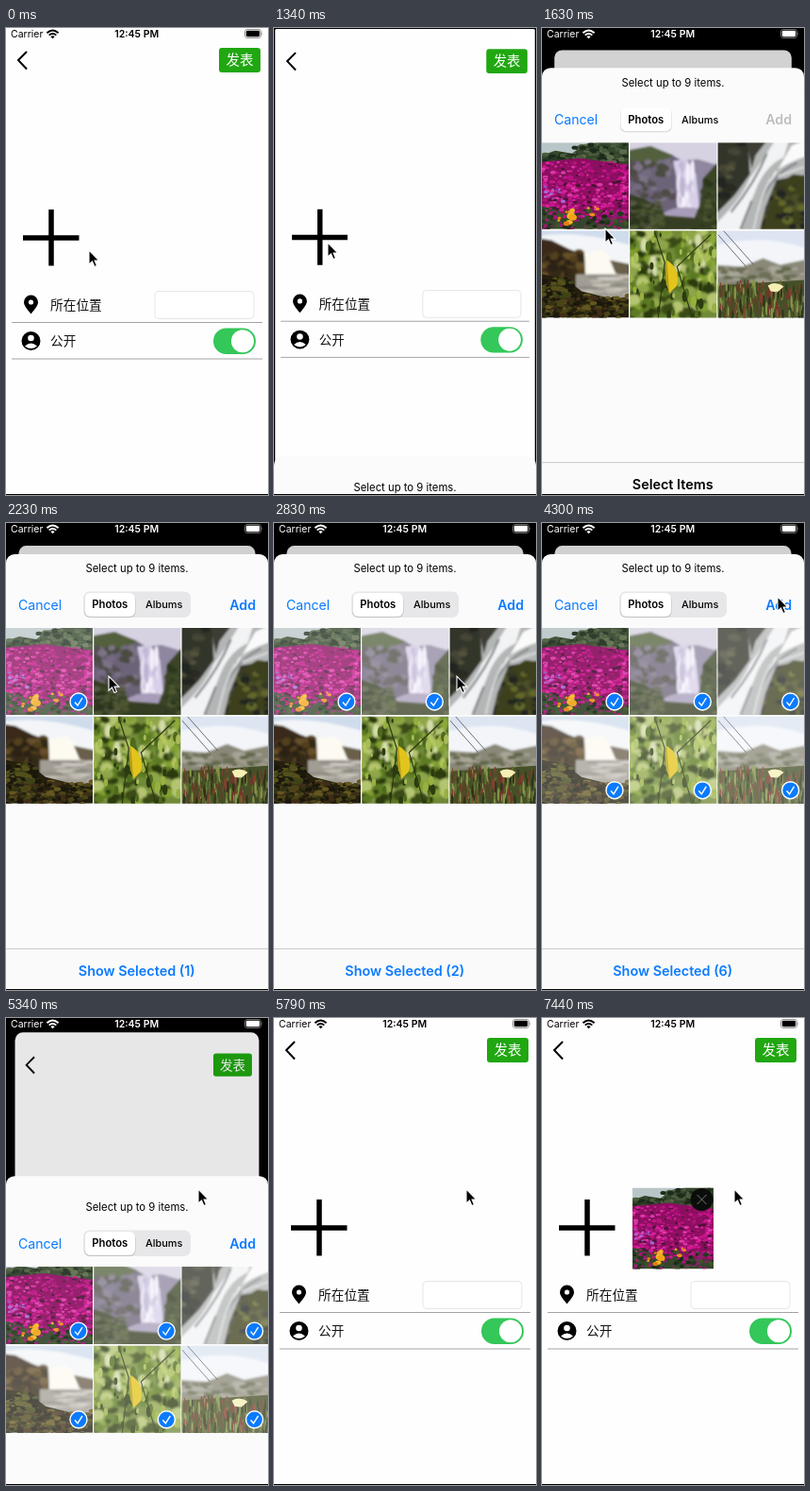
Recreate the animation shown at these times as an HTML page. Size 278x494 px, loop 8 s.

```html
<!DOCTYPE html>
<html lang="zh-CN">
<head>
<meta charset="utf-8">
<style>
  html, body { margin: 0; width: 100%; height: 100%; overflow: hidden; background: #000; }
  svg { font-family: Inter, Roboto, sans-serif; }
  #stage { display: block; width: 100vw; height: 100vh; }
  .cjk { font-family: "Noto Sans CJK SC", "Noto Sans CJK", sans-serif; font-size: 13.7px; }
  .mid { text-anchor: middle; }
  .semi { font-weight: 600; }
</style>
</head>
<body>
<svg id="stage" viewBox="0 0 278 494">
  <defs id="defs"></defs>
  <rect width="278" height="494"/>

  <g id="page">
    <rect id="card" width="278" height="494" fill="#fefefe"/>
    <g id="content">
      <path d="M22 25L13 34L22 43.5" fill="none" stroke="#000" stroke-width="2"/>
      <rect x="226" y="21" width="44" height="26" rx="3" fill="#20a711"/>
      <text class="cjk mid" x="248" y="39.3" fill="#fff" style="font-size:14.5px">发表</text>
      <path d="M18 222H77.5M48 192V251.5" stroke="#000" stroke-width="5.5"/>
      <path d="M26.5 302.5C21.5 296.5 19 293 19 290a7.5 7.5 0 0 1 15 0C34 293 31.5 296.5 26.5 302.5Z"/>
      <circle cx="26.5" cy="290" r="2.6" fill="#fff"/>
      <text class="cjk" x="47" y="297.8" fill="#111">所在位置</text>
      <rect x="158" y="278.5" width="105" height="29" rx="4" fill="#fff" stroke="#e6e6e6"/>
      <path d="M6 311.5H272M6 350H272" stroke="#a4a4a4"/>
      <circle cx="26.5" cy="331" r="10"/>
      <circle cx="26.5" cy="328" r="3.3" fill="#fff"/>
      <path d="M20 336.5Q26.5 330.5 33 336.5Q26.5 341.5 20 336.5Z" fill="#fff"/>
      <text class="cjk" x="47" y="336.3" fill="#111">公开</text>
      <rect x="220" y="317.5" width="45" height="27.5" rx="13.7" fill="#34c759"/>
      <circle cx="251" cy="331.2" r="12" fill="#fff"/>
      <g id="thumb">
        <use href="#photo0" transform="translate(96 179.5) scale(.935)"/>
        <circle cx="169.5" cy="192" r="12" fill="#0b0d0b"/>
        <path d="M164.5 187L174.5 197M174.5 187L164.5 197" stroke="#777"/>
      </g>
    </g>
    <rect id="dim" width="278" height="494"/>
  </g>

  <g id="status">
    <text x="5" y="10.2" font-size="10.5">Carrier</text>
    <g fill="none" stroke="currentColor" stroke-width="1.9">
      <path d="M43.4 5.2Q49.5 -.4 55.6 5.2M45.7 7.6Q49.5 4.2 53.3 7.6"/>
    </g>
    <path d="M47.4 9.2Q49.5 7.4 51.6 9.2L49.5 11.2Z"/>
    <text class="mid semi" x="138.7" y="10.2" font-size="10.5">12:45 PM</text>
    <rect x="253.5" y="1.5" width="17" height="9" rx="2.5" fill="none" stroke="currentColor" stroke-opacity=".45" stroke-width=".9"/>
    <rect x="254.8" y="2.8" width="14.4" height="6.4" rx="1.4"/>
    <path d="M271.6 4.6q1.6 1.4 0 2.8Z" opacity=".5"/>
  </g>

  <g id="sheet">
    <rect y="33" width="278" height="480" rx="9" fill="#fbfbfb"/>
    <g id="grid"></g>
    <g id="header">
      <rect y="60" width="278" height="51" fill="#fbfbfb"/>
      <text class="mid" x="139" y="51.7" font-size="11.3">Select up to 9 items.</text>
      <text x="13" y="91.5" font-size="14.1" fill="#0a7aff">Cancel</text>
      <rect id="track" x="82" y="72.5" width="114" height="27.5" rx="7" fill="#e7e7e9"/>
      <rect x="83" y="75" width="54.5" height="25" rx="6" fill="#000" opacity=".16"/>
      <rect x="83.5" y="74" width="53.5" height="25" rx="6" fill="#fff"/>
      <text class="mid semi" x="110.3" y="90.4" font-size="11.3">Photos</text>
      <text class="mid" x="167.7" y="90.4" font-size="10.9" font-weight="500">Albums</text>
      <text id="add" class="semi" x="265" y="91.8" font-size="14.2" text-anchor="end">Add</text>
    </g>
    <rect y="450" width="278" height="60" fill="#fafafa"/>
    <path d="M0 450.5H278" stroke="#cacaca"/>
    <text id="summary" class="mid semi" x="138.7" y="479.1" font-size="14.4"></text>
  </g>

  <path id="cursor" d="M0 0V15.2L3.5 12L6 17.6L8.5 16.5L6.1 11.1H10.8Z" stroke="#fff" stroke-width="1.1"/>
  <rect y="493" width="278" height="1"/>
</svg>

<script>
const $ = id => document.getElementById(id);

// Photo drawing: soft shapes plus seeded specks, on a 92 x 92 square.
const shape = (fill, d) => `<path fill="${fill}" d="${d}"/>`;
const line = (stroke, width, d) => `<path fill="none" stroke="${stroke}" stroke-width="${width}" d="${d}"/>`;
function specks(seed, count, x, y, w, h, rx, ry, colors) {
  const random = () => (seed = (seed * 16807) % 2147483647) / 2147483647;
  random(); random();
  const palette = colors.split(' ');
  let out = '';
  for (let i = 0; i < count; i++) {
    const cx = x + random() * w, cy = y + random() * h, k = .5 + random();
    out += `<ellipse cx="${cx.toFixed(1)}" cy="${cy.toFixed(1)}" rx="${(rx * k).toFixed(1)}" ry="${(ry * k).toFixed(1)}" fill="${palette[i % palette.length]}"/>`;
  }
  return out;
}
const soft = art => `<g filter="url(#blur)">${art}</g>`;

const photos = [
  // magenta flower field
  shape('#b9c6c8', 'M0 0H92V30H0Z') +
  shape('#35462c', 'M0 14L14 9L32 12L44 3L60 0H92V92H0Z') +
  specks(11, 90, 34, 2, 58, 20, 3, 2, '#1c2b1b #48593a #33472b #5c6b4a') +
  specks(13, 40, 0, 13, 40, 8, 3, 1.5, '#2a3b24 #4a5c3a #1c2b1b') +
  shape('#8c0e60', 'M0 21L40 17L92 24V82L50 78L0 66Z') +
  specks(23, 420, 0, 21, 92, 58, 2, 1.2, '#c8148a #da1f9c #a01070 #b81280 #4a1436 #dc3aa8 #c8148a') +
  specks(31, 110, 0, 72, 92, 20, 2.4, 1.7, '#26381f #3c5329 #1c2917 #8b1e69 #a8167a') +
  specks(8, 14, 2, 46, 22, 18, 1.7, 1.3, '#a867d6 #8d55bd') +
  specks(17, 10, 16, 72, 18, 16, 3, 2.3, '#f0a419 #f4b927 #e67d17') +
  specks(5, 5, 48, 66, 14, 16, 1.8, 1.5, '#ef8b1c #e7a626'),
  // tall waterfall among hills
  soft(shape('#d6d2e2', 'M-4 -4H96V44H-4Z') +
    shape('#6c6478', 'M-4 10L20 5L44 13L54 19L60 92H-4Z') +
    shape('#53603c', 'M-4 9L22 4L46 14L30 24L-4 32Z') +
    specks(41, 60, 0, 20, 46, 40, 4, 3, '#746a82 #564f52 #7c7385 #4b4c42') +
    shape('#8f86a0', 'M50 20L72 18L92 24V74H50Z') +
    shape('#d8d0e8', 'M46 20L60 18L70 34L74 72L52 80L50 40Z') +
    specks(43, 30, 51, 24, 16, 50, 1.6, 8, '#f4f0fa #bdb3d2 #d4cbe6 #e8e2f4') +
    shape('#a79cba', 'M34 76Q52 64 78 72L70 86H32Z') +
    shape('#3b4528', 'M96 18V96H62L74 66L78 38Z')) +
  soft(shape('#353d24', 'M-4 54L16 60L38 78L66 80L96 86V96H-4Z') +
    specks(47, 70, 0, 64, 34, 28, 4, 2, '#2a341f #4d5630 #394527 #55593f') +
    specks(48, 40, 76, 40, 18, 50, 3, 2, '#2c351f #4d5a30 #3a4427')),
  // silky stream over dark rocks
  soft(shape('#33342a', 'M-4 -4H96V96H-4Z') +
    specks(53, 70, 0, 0, 92, 92, 5, 3, '#222720 #444436 #53523a #292c24') +
    shape('#b4b6b6', 'M32 -4H96V34L62 40L50 70L44 96H-4V78L18 56L34 34Z') +
    shape('#3d3e34', 'M30 -4H54L40 14L36 28Z') +
    shape('#f2f3f4', 'M62 -4H76L70 16Q52 24 42 46L22 96H-4V88Q24 62 34 38Q46 22 62 -4Z') +
    shape('#fafafa', 'M78 4L96 -4V14Q72 22 60 32L52 50Z') +
    line('#83888a', 2.4, 'M52 12Q40 42 14 74M84 22Q58 34 46 62M36 62L24 92') +
    line('#d8dadb', 2, 'M56 38Q44 60 38 92M92 26L64 36') +
    shape('#3c3f1f', 'M64 44L80 34L96 36V96H46L54 70Z') +
    specks(59, 34, 60, 46, 32, 46, 4, 3, '#62662c #232820 #4c5028 #343724')),
  // wide fall under a cliff
  soft(shape('#cfdcec', 'M-4 -4H96V50H-4Z') +
    shape('#f3f5f8', 'M-4 6Q36 -2 96 16V40H-4Z') +
    shape('#3a2c1a', 'M-4 8L10 10L28 19L46 26L50 46L44 60H-4Z') +
    specks(61, 50, 0, 22, 42, 26, 4, 3, '#2a2014 #53401f #332918 #66502a') +
    shape('#fdfaf2', 'M45 24L64 20L76 32L80 47H46Z') +
    shape('#6a5f4c', 'M72 31L96 36V50L78 45Z') +
    shape('#a29d94', 'M36 46H96V76H36Z') +
    specks(67, 22, 44, 48, 48, 20, 10, 1.2, '#cfcbc2 #8d8a82 #bab6ac')) +
  shape('#241f0e', 'M0 46L24 50L42 64L66 70L92 72V92H0Z') +
  specks(71, 170, 0, 68, 92, 24, 3, 1.7, '#4b4418 #1a170c #655720 #343414 #402d18') +
  specks(72, 50, 0, 50, 34, 20, 3, 1.8, '#55501c #1a170c #3e4318'),
  // foliage with one yellow leaf
  soft(shape('#718a38', 'M-4 -4H96V96H-4Z') +
    specks(73, 190, 0, 0, 92, 92, 5, 4, '#3a4c18 #8ea648 #5c7a20 #b4c470 #2c3a10 #82a030') +
    specks(79, 34, 0, 0, 92, 50, 2.5, 5, '#d4dca8 #8cac38 #4a6420 #b4c860')) +
  specks(81, 60, 0, 0, 92, 92, 2, 4, '#2c3c10 #98b040 #4e6a1c #a8bc58') +
  line('#2c3812', 1.2, 'M26 0L37 34L30 92M86 4L50 38L66 92') +
  shape('#e2c41c', 'M39 31Q54 40 50 58L42 66Q35 48 39 31Z') +
  shape('#b39c1a', 'M39 31L42 66Q35 48 39 31Z'),
  // meadow on a slope
  soft(shape('#dde5f2', 'M-4 -4H96V60H-4Z') +
    shape('#f3f5f9', 'M-4 16Q50 2 96 20V40H-4Z') +
    shape('#8a8878', 'M-4 36L26 38L48 29L66 36L96 30V96H-4Z') +
    specks(83, 90, 0, 40, 92, 20, 5, 2, '#a09c8c #6c7056 #a8a698 #5f6648')) +
  line('#4a4d50', .8, 'M0 4L30 38M6 0L38 36') +
  shape('#465028', 'M0 58L92 52V92H0Z') +
  specks(89, 260, 0, 58, 92, 34, .9, 5, '#5c6e30 #6e3828 #2c341a #87954a #82402f #424e24') +
  shape('#f4efb5', 'M53 58Q61 53 70 59L63 65L56 64Z') +
  line('#84994a', 1, 'M62 64L60 82')
];
$('defs').innerHTML = '<filter id="blur"><feGaussianBlur stdDeviation=".9"/></filter>' + photos.map((art, i) =>
  `<clipPath id="clip${i}"><path d="M0 0H92V92H0Z"/></clipPath><g id="photo${i}" clip-path="url(#clip${i})">${art}</g>`).join('');

$('grid').innerHTML = photos.map((_, i) =>
  `<g transform="translate(${i % 3 * 93.3} ${111 + Math.floor(i / 3) * 93.7})">
    <use href="#photo${i}"/>
    <g class="mark">
      <rect width="92" height="92" fill="#fff" opacity=".24"/>
      <circle cx="77" cy="78" r="9" fill="#0a7aff" stroke="#fff" stroke-width="1.4"/>
      <path d="M73 78.5L76 82L81 74" fill="none" stroke="#fff" stroke-width="1.4"/>
    </g>
  </g>`).join('');
const marks = document.querySelectorAll('.mark');

const LOOP = 8000, TICK = 148.6, LEAD = 10;
const OPEN = 1300, CLOSE = 5280, TRAVEL = 461;
const selectTicks = [14, 17, 20, 26, 24, 22];
const cursorPath = [
  [0, 88, 235], [3, 57, 227], [9, 57, 227], [11, 67, 212], [13, 64, 168], [14, 68, 164],
  [15, 109, 162], [17, 142, 160], [18, 158, 160], [20, 230, 164], [22, 226, 246],
  [23, 136, 237], [24, 133, 240], [26, 50, 246], [27, 80, 215], [29, 250, 78],
  [31, 249, 81], [36, 204, 181], [54, 204, 181]
];

function cursorAt(tick) {
  const i = cursorPath.findIndex(key => key[0] > tick);
  const [t0, x0, y0] = cursorPath[i - 1], [t1, x1, y1] = cursorPath[i];
  const k = (tick - t0) / (t1 - t0);
  return [x0 + (x1 - x0) * k, y0 + (y1 - y0) * k];
}

// Critically damped spring: share of the way still to go.
function remaining(ms) {
  const s = Math.max(0, ms) * .018;
  return (1 + s) * Math.exp(-s);
}

const show = (el, on) => { el.style.display = on ? '' : 'none'; };
const move = (el, x, y) => el.setAttribute('transform', `translate(${x} ${y})`);

function render(time) {
  const tick = Math.floor((time + LEAD) / TICK);
  const t = tick * TICK - LEAD;
  let open = t < CLOSE ? 1 - remaining(t - OPEN) : remaining(t - CLOSE);
  if (open < .005) open = 0;

  const scale = 1 - .097 * open;
  $('page').setAttribute('transform',
    `translate(${139 * (1 - scale)} ${24 * open ** 1.3}) scale(${scale})`);
  for (const id of ['card', 'dim']) $(id).setAttribute('rx', 9 * Math.min(1, open * 2));
  $('dim').setAttribute('opacity', .18 * open * open);
  move($('content'), 0, 4 * open);
  show($('thumb'), tick >= 50);

  const ink = open > .05 ? '#fff' : '#000';
  $('status').setAttribute('fill', ink);
  $('status').setAttribute('color', ink);

  const drop = (1 - open) * TRAVEL, stretch = Math.min(1, drop / 135);
  show($('sheet'), open > 0);
  move($('sheet'), 0, drop);
  move($('header'), 0, 18 * stretch);
  move($('grid'), 0, 8 * stretch);
  show($('track'), tick >= 12);

  const count = selectTicks.filter(at => tick >= at).length;
  marks.forEach((mark, i) => show(mark, tick >= selectTicks[i]));
  marks[0].firstElementChild.setAttribute('opacity', tick < 27 ? .22 : .08);
  $('add').setAttribute('fill', count ? '#0a7aff' : '#bdbdbf');
  $('summary').setAttribute('fill', count ? '#0a7aff' : '#000');
  $('summary').textContent = count ? `Show Selected (${count})` : 'Select Items';

  move($('cursor'), ...cursorAt(tick));
}

const start = performance.now();
function frame() {
  render((performance.now() - start) % LOOP);
  requestAnimationFrame(frame);
}
frame();
</script>
</body>
</html>
```
